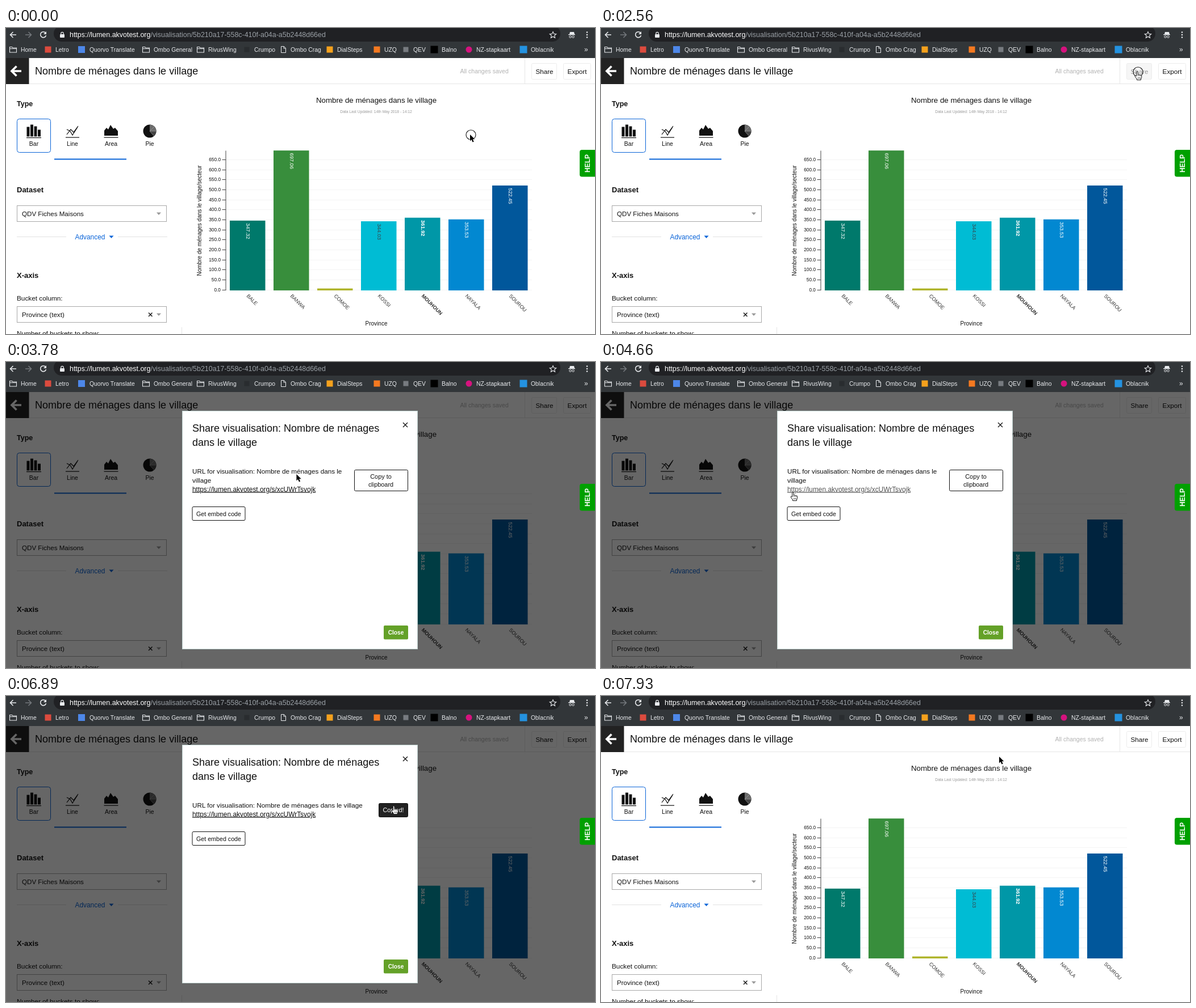
An HTML page for the animation above (8 s loop, 1037 by 540 pixels).

```html
<!DOCTYPE html>
<html lang="en">
<head>
<meta charset="utf-8">
<title>Share a visualisation</title>
<style>
html, body { margin: 0; width: 100%; height: 100%; overflow: hidden; background: #fff; }
svg { display: block; width: 1037px; height: 540px; font-family: "Liberation Sans", Arial, sans-serif; }
</style>
</head>
<body>
<svg viewBox="0 0 1037 540"><g id="page"></g><g id="live"></g></svg>
<script>
const LOOP = 8000, INK = '#111', BLUE = '#0a64d8', BASE = 11.7;
const LINK = 'https://lumen.akvotest.org/s/xcUWrTsvojk';
const TITLE = 'Nombre de ménages dans le village';

const text = (x, y, s, size = BASE, fill = INK, extra = '') =>
  `<text x="${x}" y="${y}" font-size="${size}" fill="${fill}" ${extra}>${s}</text>`;
const rect = (x, y, w, h, fill, extra = '') =>
  `<rect x="${x}" y="${y}" width="${w}" height="${h}" fill="${fill}" ${extra}/>`;
const path = (d, fill, stroke = 'none', width = 1, extra = '') =>
  `<path d="${d}" fill="${fill}" stroke="${stroke}" stroke-width="${width}" ${extra}/>`;
const line = (d, stroke, width = 1) => path(d, 'none', stroke, width);
const circle = (x, y, r, fill, extra = '') => `<circle cx="${x}" cy="${y}" r="${r}" fill="${fill}" ${extra}/>`;
const MID = 'text-anchor="middle"', BOLD = 'font-weight="bold"';
const frame = (x, y, w, h, stroke, fill = 'none', r = 2) =>
  rect(x + .5, y + .5, w - 1, h - 1, fill, `stroke="${stroke}" rx="${r}"`);
const caret = (x, y, fill) => path(`M${x} ${y}h8l-4 4.5z`, fill);

function browser() {
  const pale = '#e8eaed', dim = '#9aa0a6';
  const folder = x => line(`M${x + .5} 33.5h4l1.5 1.5h6.5v8h-12zM${x + .5} 36.5h12`, pale, 1.1);
  const marks = [[26, 'Home'], [87, 'Letro'], [147, 'Quorvo Translate'], [260, 'Ombo General'], [356, 'RivusWing'],
    [437, 'Crumpo'], [501, 'Ombo Crag'], [583, 'DialSteps'], [666, 'UZQ'], [717, 'QEV'], [767, 'Balno'],
    [828, 'NZ-stapkaart'], [924, 'Oblacnik']];
  const square = (x, fill, s = 11) => rect(x - s / 2, 38 - s / 2, s, s, fill);
  return rect(0, 0, 1037, 53, '#323639') + rect(84, -4, 892, 28, '#202124', 'rx="14"') +
    line('M18 12H8M12.5 7l-5 5 5 5', pale, 1.6) + line('M34 12h10M39.5 7l5 5-5 5', '#74787c', 1.6) +
    line('M69.5 8.5a5 5 0 1 0 1 4.5', pale, 1.6) + path('M71 6v5h-5z', pale) +
    rect(95, 11, 8, 6, pale, 'rx="1"') + line('M96.8 11v-1.5a2.2 2.2 0 0 1 4.4 0V11', pale, 1.2) +
    text(112, 16, `https://lumen.akvotest.org<tspan fill="${dim}">/visualisation/5b210a17-558c-410f-a04a-a5b2448d66ed</tspan>`, 12.44, '#fff') +
    line('M963 6.5l1.7 3.7 4 .4-3 2.7.9 4-3.6-2.1-3.6 2.1.9-4-3-2.7 4-.4z', pale, 1.1) +
    path('M993 7h7l1 4h-9z', pale) + rect(990, 11, 12, 1.3, pale) +
    circle(993.5, 15.5, 1.8, 'none', `stroke="${pale}"`) + circle(998.5, 15.5, 1.8, 'none', `stroke="${pale}"`) +
    [7.5, 12, 16.5].map(y => circle(1023, y, 1.3, pale)).join('') +
    [6, 240, 336].map(folder).join('') + line('M484.5 32.5h5l3 3v8h-8zM489 32.5v3.5h3.5', pale) +
    square(74, '#dc4b3e') + square(133, '#4d87e8', 12) + square(424, '#292c2f', 9) + square(570, '#f5a11d') +
    square(653, '#f47920') + square(704, '#777b80', 9) + square(754, '#000', 13) +
    circle(815, 38, 5.5, '#d6127e') + square(911, '#2492e0', 13) +
    marks.map(([x, s]) => text(x, 42, s, 10.4, pale)).join('') + text(1018, 42, '»', 12, pale);
}

function sidebar() {
  const kinds = ['Bar', 'Line', 'Area', 'Pie'].map((s, i) => text(49 + i * 68, 208, s, 10.5, INK, MID)).join('');
  const bars = [17, 21, 18, 12].map((h, i) => rect(36.5 + i * 6.5, 191.5 - h, 5, h, INK)).join('');
  const select = (y, s) => frame(19, y, 264, 29, '#a8a8a8', '#fff', 0) + text(28, y + 19, s, 11.6) + caret(265, y + 12.5, '#999');
  return text(19, 138, 'Type', 12.5, INK, BOLD) + frame(19, 160, 60, 60, BLUE, '#fff', 4) + kinds +
    bars + rect(36, 193, 26, 1.2, INK) +
    line('M107 188l7-9 5 5 8-11M107 179l6 3 4 7 9-14', INK, 1.2) + rect(105, 192.5, 24, 1.2, INK) +
    path('M173 190v-9l4-5 3 3 4-8 5 7 3-2 5 6v8z', INK) + rect(172.5, 192.5, 25, 1.2, INK) +
    circle(253, 182, 11.5, INK) + path('M253 182V170.5A11.5 11.5 0 0 1 264.5 182z', '#6c6c6c') +
    path('M253 182h11.5a11.5 11.5 0 0 1-4 8.7z', '#444') + line('M253 182l8-8M253 182h11.5M253 182l7.5 8.7', '#aaa', .6) +
    rect(85, 230.5, 127, 2, BLUE) +
    text(19, 290, 'Dataset', 13, INK, BOLD) + select(313, 'QDV Fiches Maisons') +
    line('M19 368.5h87M197 368.5h87', '#e2e2e2') + text(121.5, 372.5, 'Advanced', 11.9, BLUE) + caret(181.5, 366.5, BLUE) +
    text(19, 441, 'X-axis', 13, INK, BOLD) + text(19, 481, 'Bucket column:', 11.8) +
    select(491, 'Province (text)') + line('M251 502.5l6.5 6.5M257.5 502.5l-6.5 6.5', INK, 1.4) +
    text(19, 543, 'Number of buckets to show:', 11.75) + line('M309.5 528v12', '#e6e6e6');
}

function chart() {
  const zero = 462.8, unit = .3538;
  const data = [['BALE', 347.32, '#00796b'], ['BANWA', 697.06, '#388e3c'], ['COMOE', 9, '#afb42b'], ['KOSSI', 344.03, '#00bcd4'],
    ['MOUHOUN', 361.92, '#0097a7'], ['NAYALA', 353.53, '#0288d1'], ['SOUROU', 522.45, '#01579b']];
  let s = text(652, 132, TITLE, 13.3, INK, MID) +
    text(651.5, 149.5, 'Data Last Updated: 14th May 2018 - 14:12', 6.7, '#999', MID);
  for (let v = 0; v <= 650; v += 50) {
    const y = Math.round(zero - v * unit) - .5;
    s += line(`M387 ${y}h539`, '#f4f4f4') + line(`M380.5 ${y}h6.5`, '#444') +
      text(378, y + 2.9, v.toFixed(1), 8.3, INK, 'text-anchor="end"');
  }
  s += line('M387 216.5V463', '#444');
  data.forEach(([name, v, fill], i) => {
    const x = 394 + 77 * i, top = zero - v * unit, mid = x + 31;
    const weight = name === 'MOUHOUN' ? BOLD : '';
    s += rect(x, top, 62.5, zero - top + .3, fill);
    if (v > 50) s += text(0, 0, v.toFixed(2), 9.3, name === 'KOSSI' ? '#37474f' : '#fff',
      `transform="translate(${mid - 2.5} ${top + 4.3}) rotate(90)" ${weight}`);
    s += text(0, 0, name, 9, '#333', `transform="translate(${mid - 2} 473.5) rotate(45)" ${weight}`);
  });
  return s + text(0, 0, TITLE + '/secteur', 10, INK, `transform="translate(343.5 340) rotate(-90)" ${MID}`) +
    text(652, 525, 'Province', 10, INK, MID);
}

function header() {
  return rect(0, 53, 40.5, 46, '#222') + line('M27 76H11M18.5 67.5L10 76l8.5 8.5', '#fff', 3.7) +
    text(51, 82, TITLE, 18) + line('M41 98.5h996M913.5 53v45', '#e6e6e6') +
    text(799.5, 80, 'All changes saved', 10.5, '#b3b3b3') +
    frame(981, 62, 49, 29, '#ececec') + text(1005.5, 80.5, 'Export', BASE, INK, MID);
}

const within = (t, spans) => spans.some(([a, b]) => t >= a && t < b);

function modal(t) {
  const copied = t >= 5990, shift = copied ? -16 : 0;
  const dark = within(t, [[5400, 5990], [6890, 7040]]), hover = within(t, [[4660, 4960]]);
  const label = dark ? '#fff' : INK, fill = dark ? '#222' : '#fff';
  const intro = 'URL for visualisation: Nombre de ménages dans le';
  return frame(310, 86, 415, 421, '#bfd2d0', '#fff', 0) + text(328, 123, 'Share visualisation: Nombre de ménages', 18) +
    text(328, 148, 'dans le village', 18) + line('M699 107l8 8M707 107l-8 8', INK, 1.3) +
    text(328, 197, intro + (copied ? ' village' : '')) + (copied ? '' : text(328, 213, 'village')) +
    text(328, 228.5 + shift, LINK, 11.9, hover ? '#555' : INK, 'text-decoration="underline"') +
    (copied
      ? frame(656, 189, 52, 25, INK, fill) + text(682, 205, 'Copied!', 10.8, label, MID)
      : frame(613, 190, 95, 38, INK, fill) +
        text(660, 206, 'Copy to', 10.9, label, MID) + text(660, 220, 'clipboard', 10.9, label, MID)) +
    frame(327.5, 255 + shift, 94, 25, INK) + text(374.5, 271.5 + shift, 'Get embed code', 10.7, INK, MID) +
    rect(665, 465, 43, 24.5, '#64a128', 'rx="2"') + text(686.5, 481, 'Close', 10.2, '#fff', MID + ' ' + BOLD);
}

// Pointer moves: first change, last change, steps, bend point, end point
const MOVES = [
  [150, 1070, 7, [690, 150], [949, 108]],
  [1210, 1510, 3, [950, 90], [944, 77]],
  [3190, 3330, 2, [775, 113], [605, 150]],
  [3630, 4660, 8, [400, 265], [338, 230]],
  [4810, 5400, 5, [500, 242], [669, 223]],
  [6890, 7330, 4, [700, 165], [701, 107]]
];

function pointerAt(t) {
  let p = [817, 188];
  for (const [a, b, n, bend, end] of MOVES) {
    if (t < a) break;
    const k = Math.min(1, (Math.floor((t - a) / (b - a) * (n - 1) + .05) + 1) / n);
    p = p.map((v, i) => (1 - k) ** 2 * v + 2 * k * (1 - k) * bend[i] + k * k * end[i]);
  }
  return p;
}

function pointer(t) {
  const [x, y] = pointerAt(t);
  const hand = within(t, [[1360, 2710], [4660, 4960], [5400, 6140], [6890, 7040]]);
  const click = within(t, [[0, 150], [2560, 2710], [5840, 5990], [7780, 7930]]);
  const shape = hand
    ? path('M-1.3 8V1.2a1.3 1.3 0 0 1 2.6 0V5q1.5-.8 2.2.5 1.5-.7 2.2.6 1.8-.5 2 1.2v3.2l-1.2 2.5v1.7H-.5v-1.7L-3.8 8.6q-.4-1.7 1.2-1.5z', '#fff', '#111') +
      line('M1.3 5v3M3.5 5.8V8M5.7 6.4V8.3M1.5 10v2.5M3.5 10v2.5M5.3 10v2.5', '#111', .7)
    : path('M0 0v11.5l2.6-2.5 2 4.5 2.1-.9-2-4.4h3.6z', '#000', '#fff', 1.2, 'paint-order="stroke"');
  return (click ? circle(x + 1.5, y + .5, 8.5, 'none', 'stroke="#222" stroke-width="1.2"') : '') +
    `<g transform="translate(${x.toFixed(1)} ${y.toFixed(1)})">${shape}</g>`;
}

function live(t) {
  const open = within(t, [[2710, 7930]]), over = within(t, [[1360, 2710]]);
  const status = within(t, [[4810, 5840]]);
  return frame(925, 62, 45, 29, '#ececec', over ? '#f6f6f6' : '#fff') +
    text(948, 80.5, 'Share', BASE, over ? '#999' : INK, MID) +
    (open ? rect(0, 53, 1037, 487, '#000', 'opacity=".6"') : '') +
    path('M1037 215h-23q-4 0-4 4v39.5q0 4 4 4h23z', '#00a000') +
    text(0, 0, 'HELP', 12, '#fff', `transform="translate(1028 239) rotate(-90)" ${MID} ${BOLD}`) +
    (open ? modal(t) : '') +
    (status ? `<g opacity="${t < 5400 ? 1 : .2}">` + path('M0 522.5h338q4 0 4 4V540H0z', '#323639') +
      text(-4, 535, LINK, 10.6, '#dadce0') + '</g>' : '') +
    pointer(t);
}

document.getElementById('page').innerHTML = rect(0, 0, 1037, 540, '#fff') + sidebar() + chart() + header() + browser();
const layer = document.getElementById('live');
let shown = '';
function draw() {
  const next = live(performance.now() % LOOP);
  if (next !== shown) layer.innerHTML = shown = next;
  requestAnimationFrame(draw);
}
draw();
</script>
</body>
</html>
```
